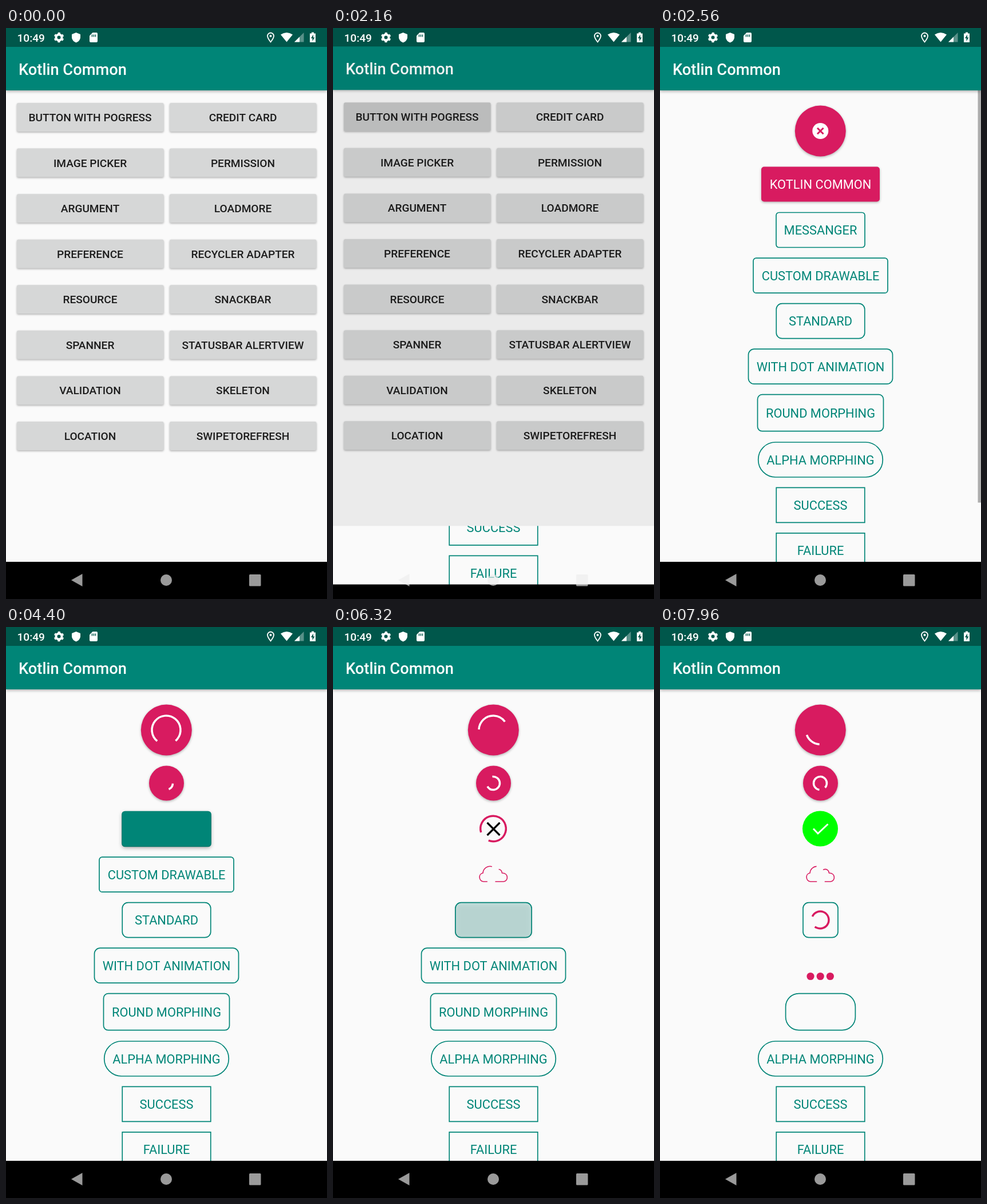
Write an HTML page with a canvas that moves like this. It is 561x998 px and loops after 8000 ms.

```html
<!DOCTYPE html>
<html lang="en">
<head>
<meta charset="utf-8">
<title>Kotlin Common</title>
<style>
html, body { margin: 0; width: 100%; height: 100%; overflow: hidden; background: #000; }
canvas { display: block; }
</style>
</head>
<body>
<canvas id="stage" width="561" height="998"></canvas>
<script>
const ctx = document.getElementById('stage').getContext('2d');
const LOOP = 8000, OPEN = 2111, OPEN_MS = 425, MORPH_MS = 300, CX = 280.5;
const TEAL = '#008577', DARK = '#00574b', PINK = '#d81b60', PAPER = '#fafafa';

const MENU = ['BUTTON WITH POGRESS', 'CREDIT CARD', 'IMAGE PICKER', 'PERMISSION', 'ARGUMENT', 'LOADMORE',
  'PREFERENCE', 'RECYCLER ADAPTER', 'RESOURCE', 'SNACKBAR', 'SPANNER', 'STATUSBAR ALERTVIEW',
  'VALIDATION', 'SKELETON', 'LOCATION', 'SWIPETOREFRESH'];

// ready: moment the morph is over and the loader starts
const BUTTONS = [
  { label: 'KOTLIN COMMON', y: 242.5, w: 207, r: 5, rEnd: 31, ready: 3861, solid: true, loader: t => spinner(t, 273, 11.5, '#fff') },
  { label: 'MESSANGER', y: 322.5, w: 155, r: 5, ready: 4970, fades: true, loader: crossLoader },
  { label: 'CUSTOM DRAWABLE', y: 402.2, w: 235, r: 5, ready: 5481, fades: true, loader: cloud },
  { label: 'STANDARD', y: 481.7, w: 154.5, r: 10, ready: 6525, loader: t => spinner(t, 512, 15, PINK) },
  { label: 'WITH DOT ANIMATION', y: 561.2, w: 252, r: 10, ready: 7214, fades: true, loader: dots },
  { label: 'ROUND MORPHING', y: 640.7, w: 220, h: 64, r: 8, rEnd: 32, ready: 8085, loader() {} },
  { label: 'ALPHA MORPHING', y: 724, w: 217.5, r: 30 },
  { label: 'SUCCESS', y: 803.3, w: 154.5, r: 0 },
  { label: 'FAILURE', y: 882.8, w: 154.5, r: 0 },
];

const clamp = x => Math.max(0, Math.min(1, x));
const mix = (a, b, p) => a + (b - a) * p;
const rad = deg => deg * Math.PI / 180;
const bezier = (p, s) => {
  const q = 1 - s;
  return q * q * q * p[0] + 3 * q * q * s * p[1] + 3 * q * s * s * p[2] + s * s * s * p[3];
};
function ease(x, xs, ys) {
  let lo = 0, hi = 1;
  for (let i = 0; i < 24; i++) {
    const s = (lo + hi) / 2;
    if (bezier(xs, s) < x) lo = s; else hi = s;
  }
  return bezier(ys, lo);
}
const fastOutSlowIn = x => ease(x, [0, .4, .2, 1], [0, 0, 1, 1]);
const extraSlowIn = x => x < 1 / 6
  ? ease(x, [0, .05, .13333, .16667], [0, 0, .06, .4])
  : ease(x, [.16667, .20833, .25, 1], [.4, .82, 1, 1]);

function rect(x, y, w, h, color) {
  ctx.fillStyle = color;
  ctx.fillRect(x, y, w, h);
}
function roundRect(x, y, w, h, r) {
  ctx.beginPath();
  ctx.roundRect(x, y, w, h, r);
}
function disc(x, y, r, color) {
  ctx.beginPath();
  ctx.arc(x, y, r, 0, 7);
  ctx.fillStyle = color;
  ctx.fill();
}
function stroke(path, color, width) {
  ctx.strokeStyle = color;
  ctx.lineWidth = width;
  ctx.stroke(new Path2D(path));
}
function fill(path, color) {
  ctx.fillStyle = color;
  ctx.fill(new Path2D(path));
}
function text(str, x, y, size, color, weight = 400, align = 'center') {
  ctx.font = `${weight} ${size}px Roboto, sans-serif`;
  ctx.textAlign = align;
  ctx.fillStyle = color;
  ctx.fillText(str, x, y);
}
function withShadow(alpha, blur, dy, draw) {
  ctx.save();
  ctx.shadowColor = `rgba(0,0,0,${alpha})`;
  ctx.shadowBlur = blur;
  ctx.shadowOffsetY = dy;
  draw();
  ctx.restore();
}

// Arc that alternately shrinks and grows while it turns
function spinner(age, y, r, color) {
  const turn = Math.floor(age / 700), u = age / 700 - turn;
  const sweep = 260 * (1 - (1 - u) ** 2), growing = turn % 2 === 1;
  const base = 20 + .18 * age - 100 * Math.ceil(turn / 2);
  const start = growing ? base : base + sweep;
  const end = growing ? base + sweep + 50 : base + 310;
  ctx.beginPath();
  ctx.arc(280, y, r, rad(start), rad(end));
  ctx.strokeStyle = color;
  ctx.lineWidth = 3.5;
  ctx.stroke();
}

function crossLoader(age) {
  const done = age - 2630;
  if (done < 120) {
    spinner(age, 352.5, 22.3, PINK);
    stroke('M269.5 342l22 22m0-22l-22 22', '#000', 3.2);
  }
  if (done > 0) {
    disc(280, 352.5, 31 * clamp(done / 120), '#0f0');
    ctx.globalAlpha = clamp((done - 120) / 80);
    stroke('M268 352.5l8 8.5L293.5 344.5', '#fff', 3);
    ctx.globalAlpha = 1;
  }
}

function cloud(age) {
  const length = 123, shift = .18 + (age - 1639) * .75 / 840;
  const dash = .33 - .06 * Math.cos((age - 1639) * Math.PI / 840);
  ctx.save();
  ctx.setLineDash([dash * length, (.5 - dash) * length]);
  ctx.lineDashOffset = -shift * length;
  stroke('M263 445C254 444 254 431 262 430C263 418 278 414 285.5 424C291 422 295 425 295.5 430' +
    'C307 430 307 444 298 445Z', PINK, 1.6);
  ctx.restore();
}

function dots(age) {
  for (let i = 0; i < 3; i++) {
    const u = (age % 900 - i * 100) / 400;
    const hop = u > 0 && u < 1 ? Math.sin(u * Math.PI) : 0;
    disc(263 + i * 17.2, 610.5 - 28 * hop, 6.6, PINK);
  }
}

function progressButton(b, t) {
  const h = b.h || 61, ready = b.ready || Infinity, morphStart = ready - MORPH_MS;
  const p = (1 - Math.cos(Math.PI * clamp((t - morphStart) / MORPH_MS))) / 2;
  const w = mix(b.w, h, p), r = mix(b.r, b.rEnd || b.r, p);
  const box = () => roundRect(CX - w / 2, b.y, w, h, r);
  const label = color => t < morphStart && text(b.label, CX, b.y + h / 2 + 8, 21.82, color);

  if (b.solid) {
    withShadow(.3, 4, 1.5, () => { box(); ctx.fillStyle = PINK; ctx.fill(); });
    label('#fff');
  } else {
    ctx.globalAlpha = b.fades ? 1 - p : 1;
    box();
    ctx.strokeStyle = TEAL;
    ctx.lineWidth = 1.7;
    ctx.stroke();
    label(TEAL);
    const press = Math.min(clamp((t - morphStart + 370) / 90), clamp((morphStart + 120 - t) / 120));
    if (press > 0) {
      ctx.globalAlpha = press;
      withShadow(.35, 7, 2.5, () => { box(); ctx.fillStyle = TEAL; ctx.fill(); });
    }
    ctx.globalAlpha = 1;
  }
  if (t >= ready) b.loader(t - ready);
}

function windowFrame(content) {
  rect(0, 0, 561, 998, PAPER);
  content();
  withShadow(.3, 5, 2, () => rect(0, 32, 561, 77, TEAL));
  rect(0, 0, 561, 33, DARK);
  text('Kotlin Common', 22, 81.5, 27.28, '#fff', 500, 'left');
  rect(0, 933, 561, 65, '#000');
}

function menuScreen(t) {
  MENU.forEach((name, i) => {
    const x = i % 2 ? 286 : 19, y = 131 + 79.57 * (i >> 1);
    withShadow(.3, 3.5, 1.5, () => {
      roundRect(x, y, 256.5, 50, 2.5);
      ctx.fillStyle = '#d6d7d7';
      ctx.fill();
    });
    if (i === 0 && t > 1980) {
      ctx.fillStyle = `rgba(0,0,0,${.07 * clamp((t - 1980) / 150)})`;
      ctx.fill();
    }
    text(name, x + 128, y + 32, 19.1, '#1c1c1c', 500);
  });
}

function progressScreen(t) {
  withShadow(.3, 4, 1.5, () => disc(280.3, 180, 44.5, PINK));
  if (t < 3060) {
    disc(280.3, 180, 14, '#fff');
    stroke('M275 174.7l10.6 10.6m0-10.6L275 185.3', PINK, 3);
  } else if (t >= 3238) {
    spinner(t - 3238, 180, 25, '#fff');
  }
  BUTTONS.forEach(b => progressButton(b, t));
  ctx.globalAlpha = clamp((4000 - t) / 250);
  rect(555.5, 109, 5.5, 720.5, '#adadad');
  ctx.globalAlpha = 1;
}

function systemIcons() {
  const white = '#fff';
  text('10:49', 19.5, 23.5, 19.1, white, 500, 'left');
  // gear
  ctx.beginPath();
  ctx.arc(92.5, 16.5, 5, 0, 7);
  ctx.strokeStyle = white;
  ctx.lineWidth = 4;
  ctx.stroke();
  ctx.save();
  ctx.setLineDash([Math.PI * 7.5 / 6]);
  ctx.lineWidth = 2.6;
  ctx.beginPath();
  ctx.arc(92.5, 16.5, 7.5, rad(15), rad(374.9));
  ctx.stroke();
  ctx.restore();
  // shield and memory card
  fill('M122.5 8l7.5 3v5c0 4-3 8-7.5 9.5c-4.500-1.500-7.500-5.500-7.500-9.500v-5z', white);
  fill('M151.500 8H158q2 0 2 2V23q0 2-2 2H148q-2 0-2-2V13.500z', white);
  stroke('M150.500 11.500v4m3-4v4m3-4v4', DARK, 1.5);
  // pin
  stroke('M462.500 24.500C459 20 457 17 457 14a5.500 5.500 0 0 1 11 0C468 17 466 20 462.500 24.500Z', white, 1.8);
  disc(462.5, 14, 2, white);
  // wifi, signal, battery
  fill('M490.500 24.500L480 11.500Q490.500 4.500 501 11.500Z', white);
  fill('M520.500 8V24.500H504z', 'rgba(255,255,255,.35)');
  fill('M513 15.500V24.500H504z', white);
  fill('M534 7.500h4v2h3V25H531V9.500h3z', white);
  fill('M537 11.500l-4 6.500h2.500v5l4-6.500H537z', DARK);
  // navigation
  const nav = 'rgba(236,236,236,.65)';
  fill('M114 965l19.500-11v22z', nav);
  disc(280, 965, 10, nav);
  roundRect(425, 955, 20.5, 20.5, 1.5);
  ctx.fill();
}

function draw(t) {
  const u = clamp((t - OPEN) / OPEN_MS), slide = fastOutSlowIn(u);
  if (u < 1) {
    ctx.save();
    ctx.translate(0, -20 * slide);
    windowFrame(() => menuScreen(t));
    ctx.restore();
    rect(0, 0, 561, 998, `rgba(0,0,0,${.1 * clamp((t - OPEN) / 83)})`);
  }
  if (u > 0) {
    const top = u < 1 ? 957 * (1 - extraSlowIn(u)) : 0;
    ctx.save();
    ctx.translate(0, 41 * (1 - slide));
    ctx.beginPath();
    ctx.rect(0, top, 561, 998);
    ctx.clip();
    windowFrame(() => progressScreen(t));
    ctx.restore();
  }
  systemIcons();
}

let begin;
function tick(now) {
  begin ??= now;
  draw((now - begin) % LOOP);
  requestAnimationFrame(tick);
}
requestAnimationFrame(tick);
</script>
</body>
</html>
```
